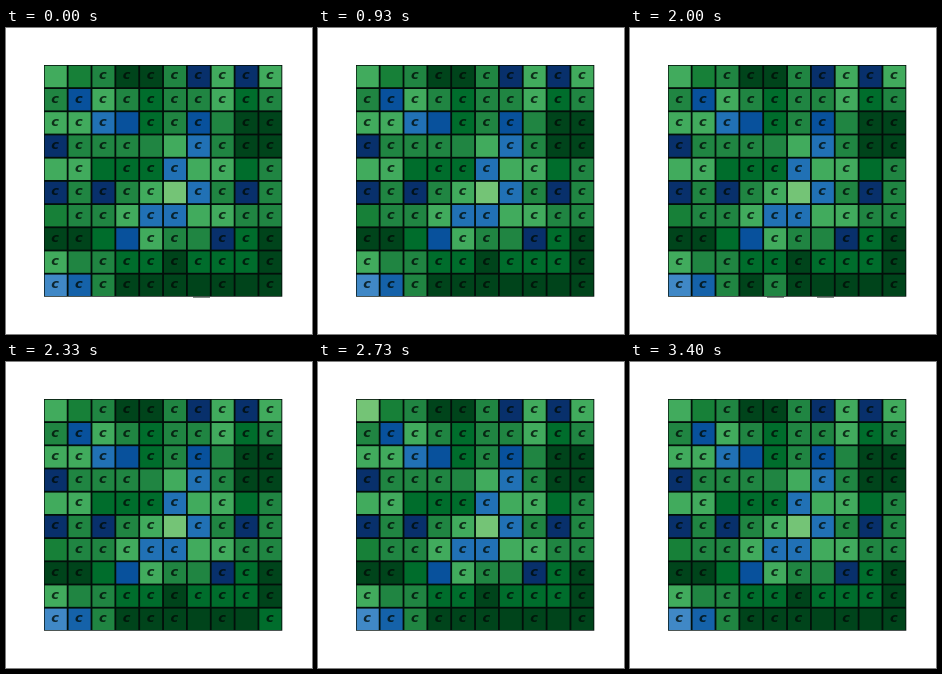
Write an HTML page with a canvas that moves like this. It is 306x306 px and loops after 3.99 s.

```html
<!DOCTYPE html>
<html lang="en">
<head>
<meta charset="utf-8">
<style>
  html, body { margin: 0; width: 100%; height: 100%; overflow: hidden; background: #fff; }
  canvas { display: block; }
</style>
</head>
<body>
<canvas id="stage" width="306" height="306"></canvas>
<script>
const ctx = document.getElementById('stage').getContext('2d');
const LOOP = 3990;
const LEFT = 37.8, TOP = 36.9, CELL_W = 23.85, CELL_H = 23.2, GAP = 1.8;

const palette = {
  A: '#a1d99b', T: '#74c476', L: '#41ab5d', M: '#208542', N: '#178038', D: '#006d2c', K: '#00441b',
  p: '#4088c6', q: '#2171b5', o: '#1562a9', r: '#08519c', s: '#08306b'
};

// Cell colours, and which cells carry a letter.
const colours = [
  'LNMKKMsLsL', 'MrLMDMMLDM', 'LLqrDMrMKK', 'sMMMMLqMKK', 'LLDDDqLLDM',
  'sMsMLTqMsM', 'NMMLqqLLMM', 'KKDrLMMsDK', 'LMMDDKDDDK', 'poMKKKKKKK'
];
const letters = [
  '..cccccccc', 'cccccccccc', 'ccc.ccc.cc', 'cccc..cccc', '.c.ccc.c.c',
  'ccccc.cccc', '.ccccc.ccc', 'cc..cc.ccc', 'c.cccccccc', 'cccccc.c.c'
];

// Temporary changes: column, row, colour, start, end, letter hidden.
const pulses = [
  [0, 0, 'T', 200, 400], [6, 9, 'D', 270, 470], [9, 9, 'D', 400, 600],
  [0, 0, 'T', 1200, 1330], [2, 1, 'L', 1270, 1470, true],
  [1, 7, 'M', 1200, 1330], [2, 7, 'M', 1270, 1400],
  [3, 7, 'q', 1270, 1470], [1, 8, 'L', 1270, 1530],
  [4, 9, 'M', 2000, 2130], [0, 0, 'T', 2130, 2330], [9, 9, 'D', 2200, 2400],
  [0, 0, 'A', 2530, 2660], [0, 0, 'T', 2660, 2800],
  [1, 0, 'L', 2530, 2730], [0, 1, 'L', 2530, 2730], [1, 1, 'q', 2530, 2730],
  [5, 7, 'q', 2530, 2660], [1, 9, 'q', 2530, 2730, true],
  [0, 5, 'o', 3000, 3200], [1, 5, 'L', 3000, 3200], [2, 5, 'r', 3000, 3200],
  [2, 4, 'M', 3000, 3200], [0, 0, 'T', 3200, 3400]
];

// Short strokes under the bottom row: x, start, end.
const strokes = [[187, 0, 930], [187, 2000, 2130], [137, 2000, 2130]];

function drawCell(col, row, t) {
  const x = LEFT + col * CELL_W, y = TOP + row * CELL_H;
  const pulse = pulses.find(([c, r, , from, to]) => c === col && r === row && t >= from && t < to);
  ctx.fillStyle = palette[pulse ? pulse[2] : colours[row][col]];
  ctx.fillRect(x + GAP / 2, y + GAP / 2, CELL_W - GAP, CELL_H - GAP);
  if (letters[row][col] === 'c' && !(pulse && pulse[5])) {
    ctx.fillStyle = 'rgba(0, 12, 6, .78)';
    ctx.fillText('c', x + 11.3, y + 14.4);
  }
}

function draw(now) {
  const t = now % LOOP;
  ctx.fillStyle = '#fff';
  ctx.fillRect(0, 0, 306, 306);
  ctx.fillStyle = '#020f0a';
  ctx.fillRect(38, 37, 238.3, 231.7);
  ctx.font = 'italic bold 13px "DejaVu Sans", sans-serif';
  ctx.textAlign = 'center';
  for (let row = 0; row < 10; row++)
    for (let col = 0; col < 10; col++) drawCell(col, row, t);
  ctx.fillStyle = '#33443a';
  for (const [x, from, to] of strokes)
    if (t >= from && t < to) ctx.fillRect(x, 268.6, 17, 1);
}

let start;
function tick(now) {
  start ??= now;
  draw(now - start);
  requestAnimationFrame(tick);
}
requestAnimationFrame(tick);
</script>
</body>
</html>
```
